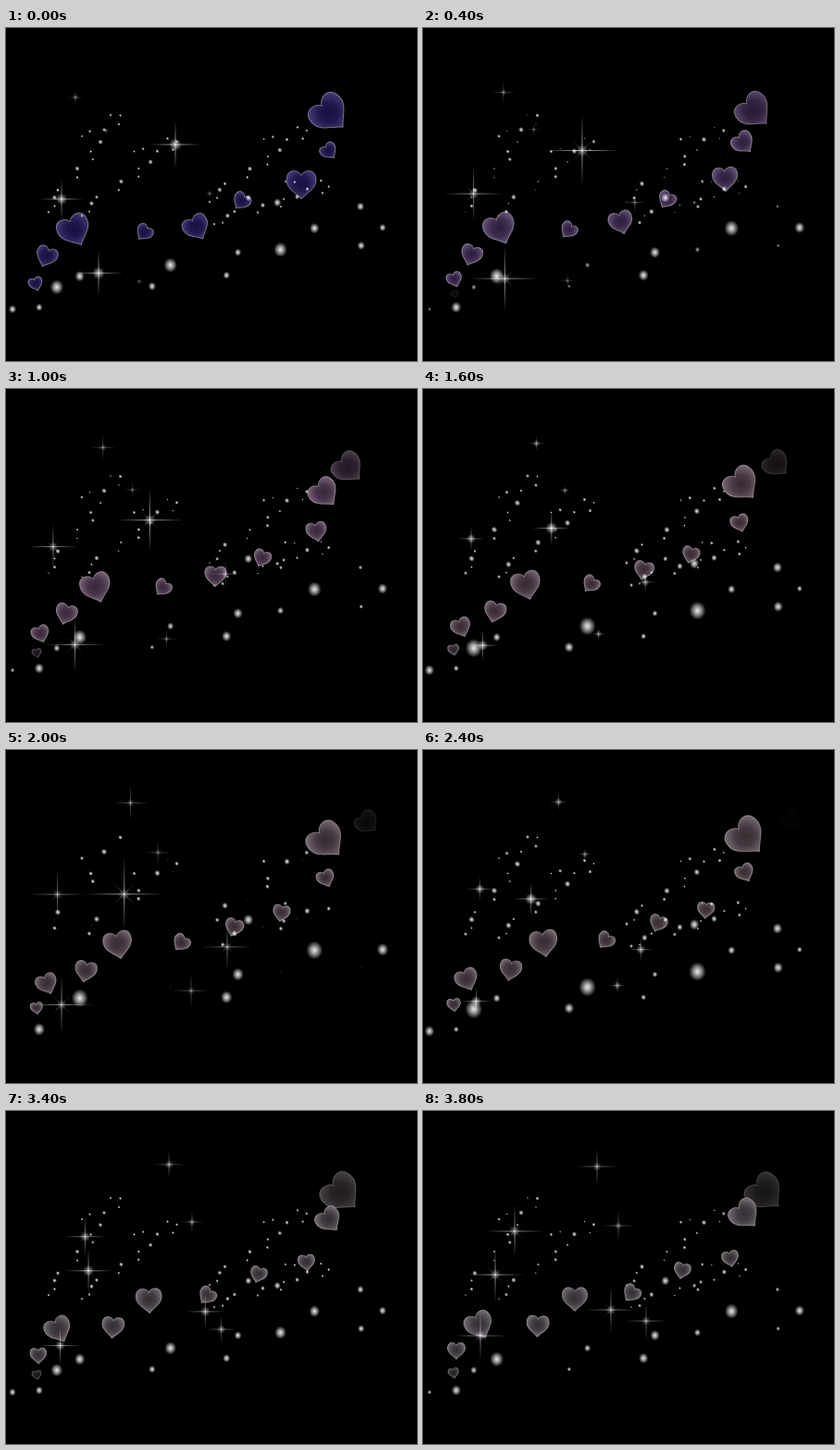
Write an HTML page with a canvas that moves like this. It is 444 by 360 pixels and loops after 4000 ms.

```html
<!DOCTYPE html>
<html lang="en">
<head>
<meta charset="utf-8">
<title>Drifting hearts</title>
<style>
  html, body { margin: 0; width: 100%; height: 100%; overflow: hidden; background: #000; }
  canvas { display: block; }
</style>
</head>
<body>
<canvas id="stage" width="444" height="360"></canvas>
<script>
const ctx = document.getElementById('stage').getContext('2d');
const LOOP = 4000, STEP = 200, SPAN = 3800;

const clamp = v => Math.max(0, Math.min(1, v));
const white = a => `rgba(255,255,255,${a})`;
const radians = deg => deg * Math.PI / 180;

// Moves from one state to another; bend pushes the middle of the way aside.
function glide({ from, to, bend = [] }, t) {
  const k = t / SPAN, arch = 4 * k * (1 - k);
  return from.map((v, i) => v + (to[i] - v) * k + (bend[i] || 0) * arch);
}

// Heart states: x, y, width, tilt in degrees.
const hearts = [
  { from: [347, 90, 41, -45], to: [426, 65, 11, -45], alpha: t => 1 - t / 2500 },
  { from: [348, 132, 18, -38], to: [367, 86, 40, -46], bend: [-14, -12, 10], alpha: t => 1 - (t - 2400) / 2500 },
  { from: [319, 169, 32, 0], to: [346, 110, 32, -42], bend: [12, 0, -13] },
  { from: [255, 186, 19, 36], to: [332, 159, 18, -12], bend: [2, 4] },
  { from: [205, 214, 28, -30], to: [280, 172, 18, 12], bend: [2, -1, -3, 26] },
  { from: [150, 220, 18, 38], to: [226, 196, 19, 38] },
  { from: [73, 217, 35, -25], to: [164, 203, 27, 0] },
  { from: [44, 246, 23, 22], to: [124, 232, 24, 3] },
  { from: [32, 276, 15, -18], to: [60, 230, 30, -27], bend: [-3, 0] }
];
const bud = { from: [35, 288, 7, -18], to: [36, 259, 19, 0], bend: [-2.5, 6], alpha: t => t / 2000 };
const BUD_GAP = 2400;

// Star states: x, y, full arm length.
const stars = [
  { from: [75, 75, 14], to: [188, 60, 27], bend: [0, -10] },
  { from: [183, 126, 48], to: [78, 177, 40], bend: [0, 3] },
  { from: [60, 185, 42], to: [99, 130, 39], bend: [-25, 0, -10] },
  { from: [100, 265, 46], to: [62, 243, 36], bend: [-20, 22, -4] },
  { from: [144, 274, 7], to: [241, 227, 28], bend: [5, 11, 2] },
  { from: [220, 179, 9], to: [203, 215, 34], bend: [28, 15, 6] },
  { from: [108, 111, 7], to: [211, 124, 22], bend: [2, -7] }
];

// One strand of dots (x, y, radius) in two sets that pulse in opposite ways.
const evenDots = [
  [0, 0, 1.7], [6.5, -15.7, 3.1], [31, -37.4, 1.7], [31, -47, 3.1],
  [56, -75.8, 3.1], [44.6, -87.3, 1.7], [76, -95, 1.7], [67, -105, 1.7]
];
const oddDots = [
  [6.5, -6.5, 2.1], [10, -23.7, 3.1], [47.8, -57, 2.1], [45.6, -65.5, 2.1],
  [36, -82, 1.8], [60, -89, 3.1], [77.5, -104.5, 2.1]
];
// The strand is repeated, turned and once enlarged.
const strands = [
  { x: 46, y: 199, turn: 0, scale: 1 },
  { x: 82, y: 203, turn: 15.4, scale: 1 },
  { x: 220, y: 188, turn: 17.1, scale: 1 },
  { x: 225, y: 212, turn: 35.3, scale: 1 },
  { x: 7, y: 304, turn: 41, scale: 3.147 }
];

// Triangle wave: 0 when the odd dots and the stars are at their largest.
function pulseAt(t) {
  const period = 840, half = period / 2;
  const phase = (t - 300 + period) % period;
  return Math.min(1, (half - Math.abs(phase - half)) / 390);
}

function tintAt(t) {
  const hue = 250 + 75 * Math.sin(Math.PI * t / 4800);
  const early = Math.exp(-t / 400);
  const sat = 20 * (1 - t / 4800) + 42 * early;
  const tone = (s, l) => `hsl(${hue},${sat * s}%,${l}%)`;
  return [tone(1, 19 - 3 * early), tone(0.85, 25 - 5 * early), tone(0.55, 43 - 9 * early)];
}

const heartPath = new Path2D(
  'M0-.3C.1-.5 .5-.55 .5-.14C.5.16 .18.28 0 .5C-.18.28-.5.16-.5-.14C-.5-.55-.1-.5 0-.3Z');

function drawHeart(heart, t, tint) {
  const alpha = heart.alpha ? clamp(heart.alpha(t)) : 1;
  if (!alpha) return;
  const [x, y, w, tilt] = glide(heart, t);
  const turn = radians(tilt);
  ctx.save();
  ctx.globalAlpha = alpha;
  ctx.translate(x, y);
  ctx.rotate(turn);
  ctx.scale(w, w);
  ctx.translate(0, 0.13 * Math.abs(Math.sin(turn)));
  const fill = ctx.createRadialGradient(0, -0.04, 0, 0, -0.04, 0.52);
  tint.forEach((c, i) => fill.addColorStop(i / 2, c));
  ctx.fillStyle = fill;
  ctx.fill(heartPath);
  ctx.lineWidth = 1 / w;
  ctx.strokeStyle = 'rgba(205,198,205,.5)';
  ctx.stroke(heartPath);
  ctx.restore();
}

function glow(x, y, r, alpha) {
  const g = ctx.createRadialGradient(x, y, 0, x, y, r);
  g.addColorStop(0, white(alpha));
  g.addColorStop(0.45, white(alpha * 0.6));
  g.addColorStop(1, white(0));
  ctx.fillStyle = g;
  ctx.fillRect(x - r, y - r, 2 * r, 2 * r);
}

function drawDots(dots, size, scale) {
  for (const [x, y, r] of dots) {
    ctx.save();
    ctx.translate(x, y);
    ctx.rotate(radians(-41));
    ctx.scale(0.9, 1);
    glow(0, 0, r * size + 0.5 / scale, Math.min(0.92, 0.15 + 2 * size));
    ctx.restore();
  }
}

function drawStrand({ x, y, turn, scale }, pulse) {
  ctx.save();
  ctx.translate(x, y);
  ctx.rotate(radians(turn));
  ctx.scale(scale, scale);
  drawDots(evenDots, pulse, scale);
  drawDots(oddDots, 1 - 0.6 * pulse, scale);
  ctx.restore();
}

function ray(x, y, dx, dy, alpha) {
  const g = ctx.createLinearGradient(x - dx, y - dy, x + dx, y + dy);
  g.addColorStop(0, white(0));
  g.addColorStop(0.5, white(alpha));
  g.addColorStop(1, white(0));
  ctx.strokeStyle = g;
  ctx.beginPath();
  ctx.moveTo(x - dx, y - dy);
  ctx.lineTo(x + dx, y + dy);
  ctx.stroke();
}

function drawStar(star, t, pulse) {
  const [x, y, size] = glide(star, t);
  const arm = size * (1 - 0.55 * pulse);
  const alpha = clamp(0.15 + size / 60);
  const diag = arm * 0.28;
  const faint = alpha * 0.6 * (1 - pulse * 0.7);
  ctx.lineWidth = 0.9;
  ray(x, y, arm, 0, alpha * 0.85);
  ray(x, y, 0, arm * 0.95, alpha * 0.85);
  ctx.lineWidth = 0.7;
  ray(x, y, diag, diag, faint);
  ray(x, y, diag, -diag, faint);
  glow(x, y, 2 + size * 0.1, alpha * (0.35 + 0.45 * pulse));
}

function draw(t) {
  const pulse = pulseAt(t), tint = tintAt(t);
  ctx.fillStyle = '#000';
  ctx.fillRect(0, 0, 444, 360);
  hearts.forEach(h => drawHeart(h, t, tint));
  drawHeart(bud, t, tint);
  drawHeart(bud, t - BUD_GAP, tint);
  strands.forEach(s => drawStrand(s, pulse));
  stars.forEach(s => drawStar(s, t, pulse));
}

const start = performance.now();
let shown = -1;
function tick() {
  const t = Math.floor(((performance.now() - start) % LOOP) / STEP) * STEP;
  if (t !== shown) draw(shown = t);
  requestAnimationFrame(tick);
}
tick();
</script>
</body>
</html>
```
